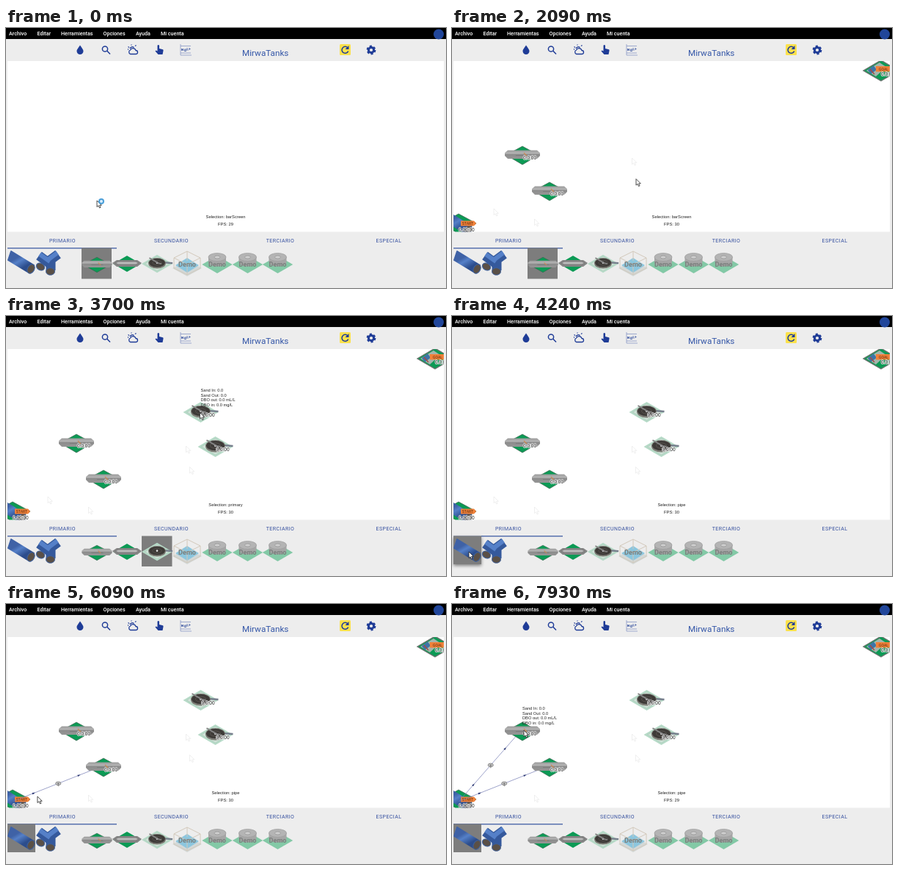
These frames come from a looping animation (600x354 px, 8000 ms). An HTML page:

```html
<!DOCTYPE html>
<html lang="es">
<head>
<meta charset="utf-8">
<title>MirwaTanks</title>
<style>
  html, body { margin: 0; width: 100%; height: 100%; overflow: hidden; background: #ededed; }
  svg { display: block; width: 600px; height: 354px; }
  text { font-family: Roboto, sans-serif; }
  .menu { font-size: 7.15px; font-weight: 500; fill: #fff; }
  .title { font-size: 11.7px; fill: #3557a8; }
  .tab { font-size: 7px; letter-spacing: .45px; fill: #344f9f; text-anchor: middle; }
  .info, .tip, .flow { font-family: "Liberation Sans", Arial, sans-serif; fill: #222; }
  .info { font-size: 5.8px; text-anchor: middle; }
  .tip { font-size: 5.7px; }
  .flow { font-size: 6.5px; stroke: #fff; stroke-width: 1.3px; paint-order: stroke; }
  .badge { font-size: 5.2px; fill: #5b2c0c; text-anchor: middle; }
  .demo { font-size: 9.2px; font-weight: 700; fill: #7b7f7d; text-anchor: middle; }
  .icon { fill: #1f3c97; }
  .line { fill: none; stroke: #1f3c97; stroke-width: 1.5; }
  .thin { stroke-width: 1.3; }
  .ghost { fill: #fff; stroke: #e4e4e4; stroke-width: .6; }
  .shadow { filter: drop-shadow(0 2px 2px #0007); }
</style>
</head>
<body>
<svg id="stage" viewBox="0 0 600 354">
  <defs>
    <clipPath id="field"><rect x="2" y="45" width="595" height="232.5"/></clipPath>
    <linearGradient id="steel" x2="0" y2="1">
      <stop stop-color="#9a9a9a"/><stop offset=".35" stop-color="#b4b4b4"/>
      <stop offset=".5" stop-color="#8c8c8c"/><stop offset="1" stop-color="#969696"/>
    </linearGradient>
    <linearGradient id="blue" gradientUnits="userSpaceOnUse" x1="-4" y1="-7" x2="4" y2="7" spreadMethod="pad">
      <stop stop-color="#3f62a6"/><stop offset=".35" stop-color="#5580c8"/><stop offset="1" stop-color="#2c4d8c"/>
    </linearGradient>
    <path id="arrow" d="M0 0V8.6L2 6.8 3.5 10 5 9.3 3.6 6.3H6.3Z"/>
    <g id="bar">
      <path d="M0-12 22 0 0 13-22 0Z" fill="#0c9a55" stroke="#345f48" stroke-width=".7"/>
      <path d="M-20-6.5H20L24-3V1L20 5H-20L-24 1V-3Z" fill="url(#steel)"/>
      <path d="M-9 .5H10" stroke="#777" stroke-width=".8"/>
      <path d="M2-3 6 1" stroke="#c98a55" stroke-width="1.3"/>
    </g>
    <g id="disc">
      <path d="M0-14 24 0 0 14-24 0Z" fill="#b6dac7"/>
      <path d="M0-11 19 0 0 11-19 0Z" fill="#cfe3d8" stroke="#a8c6b6" stroke-width=".6"/>
      <path d="M10-2 24-1" stroke="#777f8d" stroke-width="2.6"/>
      <ellipse cy="-.5" rx="13.5" ry="8" fill="#77776f"/>
      <ellipse cy="-1.5" rx="13" ry="7.2" fill="#3d3a37" stroke="#8d8d88" stroke-width=".8"/>
      <ellipse cy="-1.5" rx="7" ry="3.6" fill="none" stroke="#5d5954" stroke-width=".8"/>
      <circle cy="-1.5" r="1.5" fill="#ddd"/>
    </g>
    <path id="arm" d="M-12-9 2-1 7 0" fill="none" stroke="#858585" stroke-width="2"/>
    <g id="round">
      <path d="M0-11 20.7 1 0 13-20.7 1Z" fill="#83c9a6"/>
      <path d="M-12-9V-2A12 5.500 0 0 0 12-2V-9Z" fill="#a6a6a6"/>
      <ellipse cy="-9" rx="12" ry="5.5" fill="#b4b4b4" stroke="#9c9c9c" stroke-width=".7"/>
      <ellipse cy="-9" rx="4" ry="2" fill="#cfcfcf" stroke="#888" stroke-width=".6"/>
      <text class="demo" y="3.6">Demo</text>
    </g>
    <g id="tube">
      <path d="M-13-15-17-3 11 14 18 4Z" fill="url(#blue)" stroke="url(#blue)" stroke-width="2" stroke-linejoin="round"/>
      <ellipse cx="14" cy="9" rx="4.6" ry="6.6" transform="rotate(31 14 9)" fill="#5a5047" stroke="#3c5f9c"/>
    </g>
  </defs>

  <rect width="600" height="354" fill="#ededed"/>
  <rect width="600" height="15" fill="#000"/>
  <g id="menu"></g>
  <circle cx="590" cy="8.5" r="7" fill="#21469a"/>

  <path class="icon" d="M101 23.5C98 28 96.5 29.5 96.5 31.5A4.5 4.5 0 0 0 105.5 31.5C105.5 29.5 104 28 101 23.5Z"/>
  <circle class="line" cx="135" cy="28.5" r="3.6"/>
  <path class="line" d="M137.6 31 142 35.5"/>
  <g class="line thin">
    <path d="M169.5 35.5A3 3 0 0 1 169.5 30A4 4 0 0 1 177 30.5A2.5 2.5 0 0 1 177 35.5Z"/>
    <path d="M169 28A3.5 3.5 0 0 1 174.5 26.5M171 23.5V22.5M166.5 25.5 168 26.5M176 24.5 177.5 23.5M166 29H167"/>
  </g>
  <path class="icon" d="M206.5 24A1.3 1.3 0 0 1 209 24V28L214 29.3Q214.8 30 214.5 31L213.5 36H207.5L203.5 31.5 204.5 30.5 206.5 31.5Z"/>
  <path d="M238 22V37H253M238 24.5H252M238 34H252" fill="none" stroke="#8a99c6" stroke-width=".8"/>
  <path d="M239.5 31V28L241.5 31V28M243.5 29H245.5V31.5H243.5ZM247 27V30H248.5M250 27V30M250 28.5H251.5" fill="none" stroke="#4a62a8" stroke-width=".9"/>
  <text class="title" x="322" y="38">MirwaTanks</text>
  <rect x="455" y="22" width="15" height="15" rx="1.5" fill="#fbe14c"/>
  <path class="line" d="M466 27A4.500 4.500 0 1 0 466.700 31.500"/>
  <path class="icon" d="M467.5 24V29H462.5Z"/>
  <g class="line" transform="translate(498 30)">
    <circle r="3.6" stroke-width="3" style="stroke-width:3"/>
    <circle r="5.3" stroke-dasharray="3 2.55" style="stroke-width:2.2"/>
  </g>

  <rect x="2" y="45" width="595" height="232.5" fill="#fff"/>
  <g clip-path="url(#field)">
    <g data-on="160">
      <path d="M-15 266 9 253 33 266 9 280Z" fill="#0c9a55" stroke="#345f48" stroke-width=".7"/>
      <use href="#tube" x="8" y="266"/>
      <path d="M12 262.5H30L33 266 30 269.5H12Z" fill="#f0813a"/>
      <text class="badge" x="21.5" y="268">START</text>
      <text class="flow" x="9" y="277.3">0.00:00</text>
    </g>
    <g data-on="240">
      <path d="M561 58 585 44 609 58 585 72Z" fill="#0c9a55" stroke="#68736d" stroke-width="1.4"/>
      <path d="M565 58 583 47 592 53 578 66Z" fill="#a3b5ad"/>
      <path d="M569 60 577 54" stroke="#3e74a8" stroke-width="7"/>
      <path d="M570 56 576 63" stroke="#a34c44" stroke-width="1.5"/>
      <rect x="578" y="52" width="19" height="7.5" fill="#f0813a"/>
      <text class="badge" x="588.5" y="57.700">GOAL</text>
      <text class="flow" x="585" y="65">0.0:00</text>
    </g>
    <g id="ghosts"></g>
    <g id="links"></g>
    <g id="units"></g>
    <g id="tips"></g>
  </g>
  <text class="info" id="pick" x="299.5" y="259"></text>
  <text class="info" id="fps" x="299.5" y="268.7"></text>

  <g id="tabs"></g>
  <rect x="2" y="299" width="149" height="1.5" fill="#5871ae"/>
  <g id="marks"></g>
  <use href="#tube" x="20" y="319"/>
  <g fill="none">
    <path d="M45 310 60 321M71 308 52 322M61 317V330" stroke="#35599c" stroke-width="13"/>
    <path d="M46 308 60 318M70 306 58 315" stroke="#5580c8" stroke-width="6"/>
    <g fill="#5a5047" stroke="#3c5f9c">
      <ellipse cx="47" cy="325" rx="6" ry="4.6" transform="rotate(30 47 325)"/>
      <ellipse cx="60.5" cy="331.5" rx="6" ry="4.8"/>
    </g>
  </g>
  <use href="#bar" transform="translate(124 322) scale(.86 .82)"/>
  <g transform="translate(165 321)">
    <path d="M0-11 19 0 0 11-19 0Z" fill="#0c9a55"/>
    <path d="M-14-5H14L20-1 14 4H-14L-20-1Z" fill="#858585"/>
    <path d="M-12-3H12L16-1 12 1H-12L-16-1Z" fill="#b9b9b9" stroke="#6c6c6c" stroke-width=".7"/>
  </g>
  <g transform="translate(206 321) scale(.88)">
    <use href="#disc"/>
    <g data-on="0 2690 4160"><use href="#arm"/></g>
  </g>
  <g transform="translate(247 321)">
    <path d="M0-5 20 6 0 17-20 6Z" fill="#d3d8d7"/>
    <path d="M0-8 16 2 0 12-16 2Z" fill="#8cc6de"/>
    <path d="M-18-8 0-17 18-8 0 1ZM-18-8V6L0 15 18 6V-8M0 1V15M0-17V-4" fill="none" stroke="#d2c8ba"/>
    <text class="demo" y="3.6">Demo</text>
  </g>
  <use href="#round" x="288" y="321"/>
  <use href="#round" x="329.5" y="321"/>
  <use href="#round" x="370.5" y="321"/>

  <g id="cursor">
    <use href="#arrow" fill="#fff" stroke="#222" stroke-width=".8"/>
    <circle data-on="0 390" cx="6" cy="1" r="3" fill="#d9efff" stroke="#4b9fd8" stroke-width="2"/>
  </g>
</svg>
<script>
const LOOP = 8000;
const $ = id => document.getElementById(id);
const add = (id, html) => { $(id).innerHTML += html; };

[["Archivo", 4], ["Editar", 42.5], ["Herramientas", 75], ["Opciones", 132.5], ["Ayuda", 177], ["Mi cuenta", 211]]
  .forEach(([s, x]) => add("menu", `<text class="menu" x="${x}" y="9.6">${s}</text>`));
[["PRIMARIO", 77], ["SECUNDARIO", 225.5], ["TERCIARIO", 374], ["ESPECIAL", 522]]
  .forEach(([s, x]) => add("tabs", `<text class="tab" x="${x}" y="291.5">${s}</text>`));

// data-on lists the times at which a part turns on, off, on ...
function unit(kind, x, y, on) {
  const arm = kind == "disc" ? `<g data-on="${on + 80}"><use href="#arm"/></g>` : "";
  add("units", `<g data-on="${on}" transform="translate(${x} ${y})"><use href="#${kind}"/>${arm}
    <text class="flow" x="1" y="6.2">0.0:00</text></g>`);
}
function tip(x, y, on) {
  const rows = ["Sand In: 0.0", "Sand Out: 0.0", "DBO out: 0.0 mL/L", "DBO in: 0.0 mg/L"];
  add("tips", `<g data-on="${on}">` + rows.map((s, i) =>
    `<text class="tip" x="${x}" y="${y - 28 + i * 6.7}">${s}</text>`).join("") + "</g>");
}
function link(x, y, on) {
  const x0 = 9.5, y0 = 268.7;
  const at = k => `${x0 + (x - x0) * k} ${y0 + (y - y0) * k}`;
  const turn = Math.atan2(y - y0, x - x0) * 180 / Math.PI;
  const head = k => `<path d="M2 0-2-1.3V1.3Z" fill="#27336f" transform="translate(${at(k)}) rotate(${turn})"/>`;
  add("links", `<g data-on="${on}"><path d="M${at(0)}L${at(1)}" stroke="#747bb4" stroke-width=".7"/>
    ${head(.23)}${head(.73)}<g transform="translate(${at(.5)})" stroke="#555" stroke-width=".7">
    <ellipse rx="3.6" ry="2.3" fill="#ddd"/><path d="M-2 0H2M0-1V4"/></g></g>`);
}
function mark(x, w, h, on, hover) {
  const box = c => `<rect x="${x}" y="299.5" width="${w}" height="${h}" ${c}/>`;
  add("marks", `<g data-on="${hover}">${box('fill="#ddd" class="shadow"')}</g>
    <g data-on="${on}">${box('fill="#7d7d7d"')}</g>`);
}

unit("bar", 133, 222, 620);
unit("bar", 96, 173, 1230);
unit("disc", 285.5, 178, 2920);
unit("disc", 265.5, 131, 3390);
tip(133, 222, "620 850 5550 5890");
tip(96, 172, "1230 1400 7300");
tip(285.5, 179, "2920 3200");
tip(265.5, 131, "3390 3740");
tip(9, 271, "4780 5120 6400 6850");
link(133, 220, 5700);
link(96, 170, 7550);
mark(103, 41, 42, "0 2690", LOOP);
mark(185, 41.5, 41.5, "2690 4160", "2400 2760");
mark(2, 38, 38.5, "4160", "1630 1780 4040 4620");
[[57, 246, "1550 5400"], [112.5, 260, 1860], [245.5, 177, 1940], [250.5, 205.5, 2170]]
  .forEach(([x, y, on]) => add("ghosts", `<g data-on="${on}"><use class="ghost" href="#arrow" x="${x}" y="${y}"/></g>`));

// time, x, y of the pointer tip
const path = [
  [0, 124, 235], [160, 124, 235], [390, 134, 222], [700, 134, 222], [1080, 97, 172], [1360, 97, 172],
  [1550, 57, 246], [1700, 23, 321], [1860, 112.5, 260], [1940, 245.5, 177], [2010, 251, 205.5],
  [2130, 251, 205.5], [2420, 206, 322], [2700, 206, 322], [2920, 287, 179], [3150, 287, 179],
  [3390, 266, 132], [3700, 265, 131], [4080, 23, 321], [4520, 23, 321], [4820, 13, 268],
  [5050, 13, 268], [5550, 134, 222], [5850, 134, 222], [6090, 43, 262], [6380, 14, 269],
  [6750, 14, 269], [7300, 98, 172], [LOOP, 98, 172]
];
function pointer(t) {
  const i = path.findIndex(p => p[0] > t);
  const [a, x, y] = path[i - 1], [b, u, v] = path[i];
  const k = (t - a) / (b - a);
  return [x + (u - x) * k, y + (v - y) * k];
}

const parts = [...document.querySelectorAll("[data-on]")]
  .map(el => [el, el.dataset.on.split(" ").map(Number)]);
const slow = [[0, 310], [850, 1080], [1700, 1860], [2400, 2550], [2920, 3160], [3860, 4010],
  [4700, 4860], [5320, 5470], [6240, 6400], [7000, 7160], [7780, LOOP]];
const start = performance.now();

function draw(now) {
  const t = Math.max(0, now - start) % LOOP;
  for (const [el, times] of parts)
    el.style.display = times.filter(s => s <= t).length % 2 ? "" : "none";
  $("cursor").setAttribute("transform", `translate(${pointer(t)})`);
  $("pick").textContent = "Selection: " + (t < 2690 ? "barScreen" : t < 4160 ? "primary" : "pipe");
  $("fps").textContent = "FPS: " + (slow.some(([a, b]) => t >= a && t < b) ? 29 : 30);
  requestAnimationFrame(draw);
}
draw(start);
</script>
</body>
</html>
```
